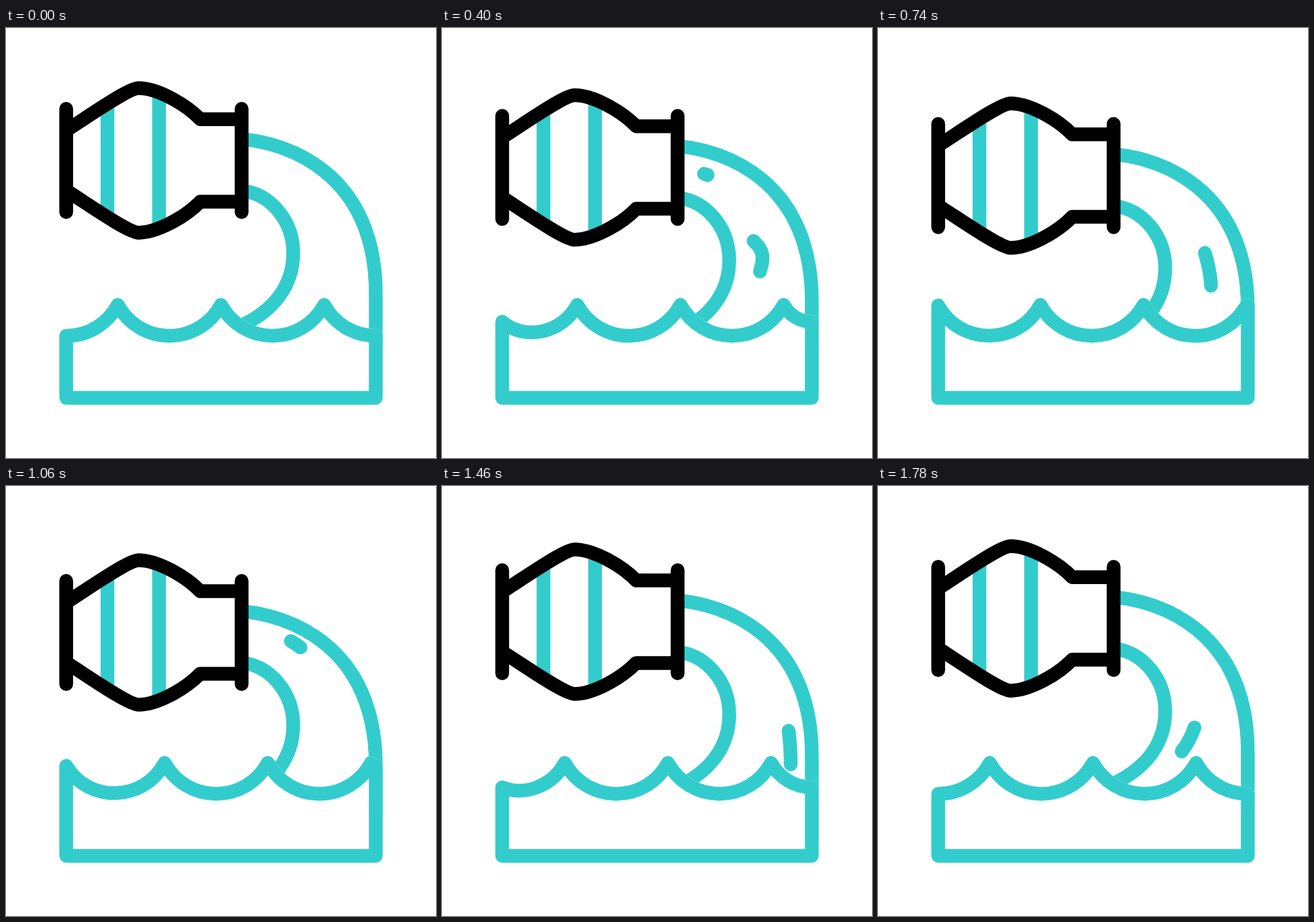
Write an HTML page that moves like this. It is 640 by 640 pixels and loops after 1800 ms.

```html
<!DOCTYPE html>
<html lang="en">
<head>
<meta charset="utf-8">
<title>Water pipe</title>
<style>
html, body { margin: 0; height: 100%; overflow: hidden; background: #fff; }
svg { display: block; width: 100vw; height: 100vh; }
path { fill: none; stroke-width: 20.48; stroke-linejoin: round; }
.round { stroke-linecap: round; }
.water { stroke: #3cc; }
.pipe { stroke: #000; }
</style>
</head>
<body>
<svg viewBox="0 0 640 640">
  <mask id="above" maskUnits="userSpaceOnUse" x="0" y="0" width="640" height="640">
    <rect width="640" height="640" fill="#fff"/>
    <path class="wave" style="fill:#000;stroke:#000"/>
  </mask>
  <g mask="url(#above)">
    <g class="bob water">
      <path d="M350.7 166C380 166.5 550.4 190 550.4 396V470"/>
      <path d="M350.7 242C395 247 427.5 288 427.5 335C427.5 382 400 420 350 443"/>
      <path class="streak round" data-start="138" d="M398 222C430 240 450 292 466 309C477 319 480 330 474 349Q468 374 452 395"/>
      <path class="streak round" data-start="393" d="M390 206.5C440 222 470 262 485 307Q493 333 495 352L498 395"/>
      <path class="streak round" data-start="1036" d="M424 210C456 228 484 262 496 290Q507 316 512 337C515 350 519 375 519 410V425"/>
    </g>
  </g>
  <path class="wave water"/>
  <g class="bob">
    <path class="water" d="M151 116V278M227.8 100V294"/>
    <g class="pipe">
      <path id="side" d="M89.6 152.5C125 130 182 89.6 197.5 89.6C224 89.6 266 112 289 135.7H350.7"/>
      <use href="#side" transform="matrix(1 0 0 -1 0 394.24)"/>
      <path class="round" d="M89.6 120.3V273.9M350.7 120.3V273.9"/>
    </g>
  </g>
</svg>
<script>
const LOOP = 1800, PEAK = 840, END = 1780, STREAK = 50;
const all = s => [...document.querySelectorAll(s)];
const waves = all('.wave'), bobs = all('.bob');
const streaks = all('.streak').map(el => ({
  el, start: +el.dataset.start, length: el.getTotalLength()
}));
const mix = (a, b, p) => a + (b - a) * p;

// Equivalent to cubic-bezier(.5, 0, .5, 1)
function ease(x) {
  if (x <= 0 || x >= 1) return x <= 0 ? 0 : 1;
  let lo = 0, hi = 1;
  for (let i = 0; i < 24; i++) {
    const s = (lo + hi) / 2;
    if (1.5 * s * (1 - s) + s ** 3 < x) lo = s; else hi = s;
  }
  return lo * lo * (3 - 2 * lo);
}

// The first trough opens while the last one closes.
function wavePath(p) {
  const left = 89.6, top = 412.16, depth = 46.08, k = 1 - p;
  const arc = 'a87.1 87.1 0 0 0 153.6 0';
  return `M${left} ${top + depth * k}` +
    `C${left + mix(32.2, 32.8, p)} ${top + mix(depth, 61.4, p)} ` +
    `${left + mix(61.6, 120.8, p)} ${top + mix(28.4, 61.4, p)} ` +
    `${left + mix(76.8, 153.6, p)} ${top}${arc}${arc}` +
    `c${15.2 * k} ${28.4 * k} ${44.6 * k} ${depth * k} ${76.8 * k} ${depth * k}` +
    `V550.4H${left}Z`;
}

function drawStreak({ el, start, length }, t) {
  const age = t - start;
  const head = age * (0.69 - 0.00034 * age);
  const from = Math.max(0, head - STREAK);
  const size = Math.min(head, length) - from;
  el.style.display = age > 0 && size > 0 ? '' : 'none';
  el.setAttribute('stroke-dasharray', `${Math.max(size, 0)} 9999`);
  el.setAttribute('stroke-dashoffset', -from);
}

function draw(now) {
  const t = now % LOOP;
  const p = t < PEAK ? ease(t / PEAK) : 1 - ease((t - PEAK) / (END - PEAK));
  const d = wavePath(p);
  waves.forEach(w => w.setAttribute('d', d));
  bobs.forEach(b => b.setAttribute('transform', `translate(0 ${23.04 * p})`));
  streaks.forEach(s => drawStreak(s, t));
}

const began = performance.now();
function frame() {
  draw(performance.now() - began);
  requestAnimationFrame(frame);
}
frame();
</script>
</body>
</html>
```
